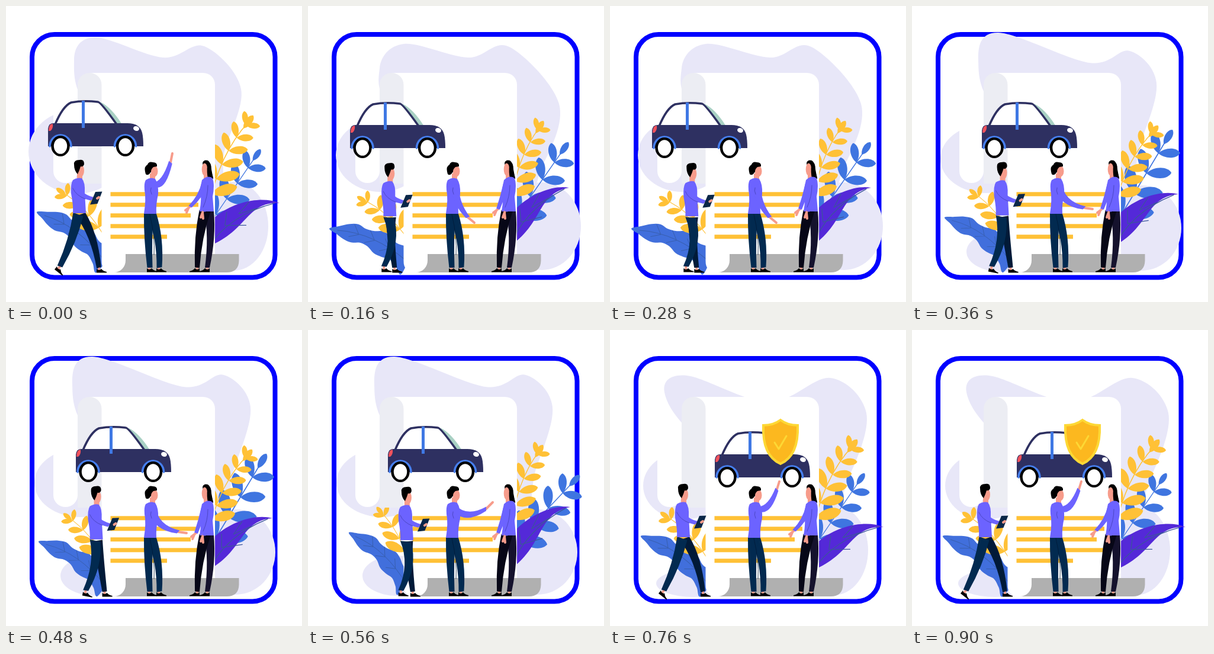
Recreate the animation shown at these times as an HTML page. Size 500 by 500 pixels, loop 1000 ms.

```html
<!DOCTYPE html>
<html lang="en">
<head>
<meta charset="utf-8">
<title>Car insurance</title>
<style>
html, body { margin: 0; width: 100%; height: 100%; overflow: hidden; background: #fff; }
svg { display: block; width: 100%; height: 100%; }
</style>
</head>
<body>
<svg id="stage" viewBox="0 0 500 500"></svg>
<script>
const LILAC = '#e8e7f8', GOLD = '#ffc136', BLUE = '#3f75e0', VIOLET = '#6c63ff', CREASE = '#4540b5',
  SKIN = '#f79c8b', NAVY = '#022a50', DEEP = '#011a38', INK = '#070717', PLUM = '#15122d', BODY = '#2e3061';

const shape = (d, fill) => `<path d="${d}" fill="${fill}"/>`;
const line = (d, color, w) =>
  `<path d="${d}" fill="none" stroke="${color}" stroke-width="${w}" stroke-linecap="round" stroke-linejoin="round"/>`;
const oval = (x, y, rx, ry, fill) => `<ellipse cx="${x}" cy="${y}" rx="${rx}" ry="${ry}" fill="${fill}"/>`;
const group = (transform, body) => `<g transform="${transform}">${body}</g>`;
const move = (x, y, body) => group(`translate(${x} ${y})`, body);
const range = (n, f) => Array.from({ length: n }, (_, i) => f(i));

// Stretches the unit axis (0,0)-(100,0) evenly onto base-tip.
function plant([x, y], [tx, ty], body) {
  const u = (tx - x) / 100, v = (ty - y) / 100;
  return group(`matrix(${u} ${v} ${-v} ${u} ${x} ${y})`, body);
}

// Closed smooth curve through the points.
function smooth(p) {
  const at = i => p[(i + p.length) % p.length];
  return 'M' + p[0] + p.map((b, i) => {
    const a = at(i - 1), c = at(i + 1), e = at(i + 2);
    return `C${b.map((v, k) => v + (c[k] - a[k]) / 6)} ${c.map((v, k) => v - (e[k] - b[k]) / 6)} ${c}`;
  }).join('') + 'Z';
}

// Tapered arm or leg, bent at one joint; w and v are half widths.
function limb([x, y], [jx, jy], [ex, ey], w, v, color) {
  const len = Math.hypot(ex - x, ey - y), nx = (y - ey) / len, ny = (ex - x) / len, m = (w + v) / 2;
  const off = (px, py, k) => `${px + nx * k} ${py + ny * k}`;
  return shape(`M${off(x, y, w)}Q${off(jx, jy, m)} ${off(ex, ey, v)}L${off(ex, ey, -v)}Q${off(jx, jy, -m)} ${off(x, y, -w)}Z`, color);
}

// Stem with leaf pairs that shrink towards the tip.
function sprig(base, tip, color, { pairs, from, to, size, taper, bend }) {
  const leaf = (x, y, turn, len) => {
    const w = len * .28;
    return group(`translate(${x} ${y}) rotate(${turn})`,
      shape(`M0 0C${len * .3} ${-w} ${len * .85} ${-w} ${len} 0C${len * .85} ${w} ${len * .3} ${w} 0 0`, color));
  };
  const leaves = range(pairs, i => {
    const t = from + (to - from) * i / (pairs - 1), len = size - taper * t;
    const x = 100 * t, y = bend * 2 * t * (1 - t), tilt = bend * (1 - 2 * t);
    return leaf(x, y, tilt + 58, len) + leaf(x, y, tilt - 44, len);
  });
  return plant(base, tip, line(`M0 0Q50 ${bend} 92 ${bend * .15}`, color, .9) +
    leaf(84, bend * .27, -bend * .8, 16) + leaves.join(''));
}

const goldKind = { pairs: 6, from: .12, to: .88, size: 28, taper: 16, bend: -14 };
const blueKind = { pairs: 4, from: .08, to: .74, size: 31, taper: 14, bend: 0 };
const smallKind = { pairs: 4, from: .2, to: .82, size: 37, taper: 24, bend: 14 };

// Axis runs from the clipped corner to the pointed tip.
const bigLeaf = tip => plant([340, 410], tip,
  shape('M-7 -4C13 -42 81 -28 100 0C67 -24 48 12 -7 -4Z', '#5429d8') +
  line('M0 0Q43 -20 95 -3M32 -12L53 1M53 -15L74 -9M32 -12L42 -24M53 -15L70 -20', '#3c549c', .9));

// Leaf with a rippled outline around a bent spine.
function waveLeaf(tip) {
  const bend = t => 8 * Math.sin(Math.PI * t);
  const half = t => Math.sqrt(1 - t ** 6) * (14 - 5 * t + 2.5 * Math.cos(17 * t));
  const edge = side => range(11, i => [10 * i, bend(i / 10) + side * half(i / 10)]);
  const veins = [.25, .45, .65].map(t =>
    `M${100 * t} ${bend(t)}l9 9M${100 * t} ${bend(t)}l10 -7`).join('');
  return plant([167, 431], tip, shape(smooth([...edge(1), ...edge(-1).reverse().slice(1)]), '#416fdc') +
    line('M0 0Q50 16 90 2' + veins, '#385faf', .7));
}

// Wavy crest above the page, plus the lobes at its sides.
function blob({ crest, lobes }) {
  const [x, y] = crest[4];
  return shape(smooth([...crest, [x - 28, y + 105], [345, 330], [150, 185]]), LILAC) +
    lobes.map(l => oval(...l, LILAC)).join('');
}

function car(x, y) {
  const wheel = cx => line(`M${cx - 18} 237A18 19 0 0 1 ${cx + 18} 237`, '#467fee', 3.5) +
    oval(cx, 236.5, 15.7, 17.5, '#000') + oval(cx, 236.5, 11.2, 13.3, '#fff');
  return move(x, y,
    shape('M159 162Q178 171 196 200H185Z', '#a9d1c4') +
    `<path d="M83 200Q96 169 110 163Q131 159 155 162Q160 162 187 200" fill="#fff" stroke="${BODY}" stroke-width="3.6"/>` +
    shape('M71 237V207Q72 198 80 198H205Q226 198 230 214Q232 222 232 237Z', BODY) +
    shape('M128 160H133V206H128Z', '#3f78e4') +
    shape('M72 211Q72 199 79 199Q80 207 75 211Z', '#f0525c') +
    group('rotate(15 220 207)', oval(220, 207, 5, 4, '#fff')) + wheel(92) + wheel(201.5));
}

const shield =
  '<path d="M288 152Q300 161 317 161Q319 212 288 226Q257 212 259 161Q276 161 288 152Z" fill="#fcb81f" stroke="#fdd835" stroke-width="4"/>' +
  line('M278 190L285 201L298 179', '#fdd835', 3);

const shoe = (x, y, dir = 1, tilt = 0) => group(`translate(${x} ${y}) rotate(${tilt}) scale(${dir} 1)`,
  line('M0 -2V4', SKIN, 4) + shape('M-4 3Q0 7 4 3Q7 7 13 8V9.500H-4Z', '#000'));

// The body rises as the legs spread.
function walker({ step, stride }) {
  const x = 14.3 * step, y = (66 - stride) / 9, mid = x + 124 - step % 3, hip = y + 352;
  const back = mid - stride / 2, front = mid + stride / 2;
  return shoe(back, 440, 1, (stride - 18) * .8) + shoe(front, 441) +
    limb([x + 126, hip], [front - 8, 385], [front, 442], 8.5, 4, DEEP) +
    limb([x + 122, hip], [back + 22, 397], [back, 440], 9, 4.5, NAVY) +
    move(x, y,
      shape('M120 281H129V295H120Z', SKIN) + oval(126, 278, 6, 11, SKIN) +
      shape('M115 268Q114 260 124 260Q132 258 132 267Q131 272 126 271L124 277L121 284Q115 278 115 268Z', '#000') +
      shape('M113 294Q121 289 128 291Q134 298 133 315L135 350H113Q114 338 110 317Q109 300 113 294Z', VIOLET) +
      line('M142 325L155 324', SKIN, 4) + limb([117, 301], [118, 319], [146, 326], 6, 3.5, VIOLET) +
      line('M113 308Q118 320 134 326', CREASE, .8) +
      shape('M151 314L162.500 313.500L154.500 334L142 335.500Z', '#0a2748') + line('M154 325L157 323', SKIN, 4));
}

function adviser([elbow, wrist, finger]) {
  return shoe(242, 440) + shoe(258, 440) +
    limb([246, 350], [261, 392], [259, 442], 7.5, 4.5, NAVY) + limb([241.5, 350], [239, 392], [243, 442], 8.5, 4.5, NAVY) +
    line('M243 352Q252 390 250 420', DEEP, .8) +
    shape('M243 283H252V296H243Z', SKIN) + oval(250.5, 279, 6, 9.5, SKIN) +
    shape('M235 280Q233 271 239 268Q241 262 248 264Q256 264 255 271L249 272Q245 275 245 280Q240 288 236 284Z', '#000') +
    shape('M236 294Q244 288 252 292Q258 301 257 318Q253 335 254 351H233Q237 326 234 311Q233 299 236 294Z', VIOLET) +
    line(`M${wrist}L${finger}`, SKIN, 4) + limb([248, 302], elbow, wrist, 7, 3.5, VIOLET) +
    line('M245 307Q243 312 246 318', CREASE, .8);
}

// One hand reaches out when open, otherwise both are folded forward.
function client(open) {
  const [x, y] = open ? [311, 339] : [321, 343];
  return shoe(323, 440, -1) + shoe(340, 440, -1) +
    limb([343, 346], [349, 390], [340, 442], 8, 4, PLUM) + limb([336, 346], [324, 390], [323, 442], 9.5, 4, INK) +
    line(`M${x} ${y}l-8 6m5 -3l-3 7`, SKIN, 4) + limb([335, 300], [329, 322], [x, y], 5, 3, VIOLET) +
    shape('M332 265Q334 259 341 261Q347 265 347 276L350 292H336Z', '#000') +
    shape('M334 280H341V293H334Z', SKIN) + oval(335.500, 276, 4.8, 10.500, SKIN) +
    shape('M333 263Q340 258 345 267Q347 282 350 290L341 291Q339 282 340 268Z', '#000') +
    shape('M331 294Q341 285 349 291Q353 302 349 322L351 347H327Q331 325 328 309Z', VIOLET) +
    line('M333 346L329 357M332 349L333 359', SKIN, 4) + limb([346, 299], [345, 326], [334, 347], 4.5, 3, VIOLET) +
    line('M341 303Q341 322 333 340', CREASE, .8);
}

const frame = '<rect x="44" y="48" width="410.500" height="410.500" rx="38" fill="none" stroke="#00f" stroke-width="8"/>';

const page =
  shape('M80 170H121V279A20.500 20 0 0 1 80 279Z', '#fff') +
  shape('M121 133A20 20 0 0 1 141 113H165V300H121Z', '#ecedf3') +
  shape('M185 419H393.500V430Q393 450 373 450H180Z', '#b0b0b0') +
  shape('M141 113H333A20 20 0 0 1 353 133V419H202V430A20 20 0 0 1 182 450Q161 450 161.500 430V133A20 20 0 0 0 141 113Z', '#fff') +
  [330, 325, 312, 325, 272].map((end, i) =>
    `<rect x="176.500" y="${314.300 + 18 * i}" width="${end - 176.500}" height="7" fill="${GOLD}"/>`).join('');

// Poses shared by two moments each.
const striding = {
  gold: [419, 185], blue: [430, 242], big: [462, 333], small: [84, 308], wave: [52, 348],
  walk: { step: 0, stride: 66 }, open: true
};
const swell = {
  crest: [[112, 92], [146, 45], [300, 96], [368, 76], [413, 130]],
  lobes: [[125, 258, 77, 58], [388, 375, 67, 72], [150, 415, 58, 34]]
};

const poses = [
  { ...striding, until: 160, car: [0, 0],
    crest: [[115, 92], [150, 53], [265, 87], [335, 68], [397, 140]],
    lobes: [[120, 246, 82, 71], [385, 372, 58, 75]],
    arm: [[266, 307], [278, 264], [281, 249]] },
  { until: 360, car: [0, 3],
    crest: [[121, 105], [162, 64], [270, 87], [340, 69], [424, 165]],
    lobes: [[122, 252, 75, 62], [395, 372, 66, 74]],
    gold: [399, 194], blue: [440, 230], big: [441, 307], small: [82, 322], wave: [36, 376],
    walk: { step: 1, stride: 18 },
    arm: [[249, 333], [270, 357], [281, 366]] },
  { ...swell, until: 560, car: [47, 3],
    gold: [417, 202], blue: [440, 209], big: [450, 318], small: [96, 310], wave: [55, 357],
    walk: { step: 2, stride: 32 },
    arm: [[252, 334], [291, 341], [305, 343]] },
  { ...swell, until: 760, car: [64, 3],
    gold: [398, 194], blue: [459, 245], big: [443, 299], small: [115, 299], wave: [69, 342],
    walk: { step: 3, stride: 20 },
    arm: [[268, 322], [301, 302], [312, 291]] },
  { ...striding, until: 1000, car: [106, 12], shield,
    crest: [[92, 105], [130, 77], [268, 122], [372, 81], [433, 140]],
    lobes: [[125, 263, 69, 57], [378, 372, 58, 76], [140, 428, 62, 23]],
    arm: [[268, 309], [282, 269], [286, 256]] }
];

const scene = p =>
  frame + blob(p) +
  sprig([348, 362], p.blue, BLUE, blueKind) + sprig([343, 338], p.gold, GOLD, goldKind) + bigLeaf(p.big) +
  waveLeaf(p.wave) + sprig([170, 396], p.small, GOLD, smallKind) +
  page + car(...p.car) + (p.shield || '') +
  walker(p.walk) + client(p.open) + adviser(p.arm);

const stage = document.getElementById('stage');
const start = performance.now();
let shown;

function draw() {
  const t = Math.max(0, performance.now() - start) % 1000;
  const pose = poses.find(p => t < p.until);
  if (pose !== shown) {
    stage.innerHTML = scene(pose);
    shown = pose;
  }
  requestAnimationFrame(draw);
}
draw();
</script>
</body>
</html>
```
